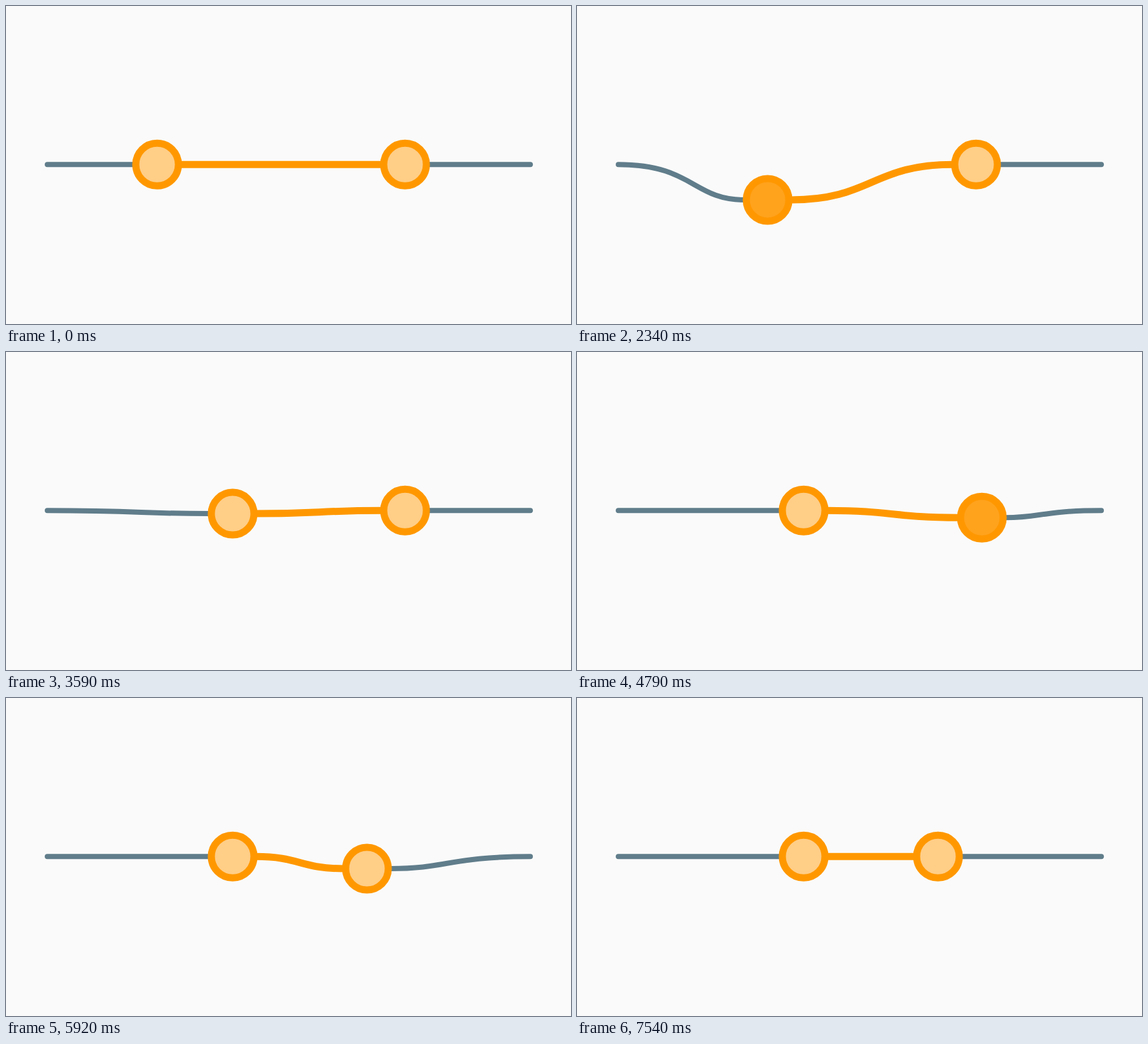
Recreate the animation shown at these times as an HTML page. Size 875 px wide and 492 px high, loop 7620 ms.

```html
<!DOCTYPE html>
<html lang="en">
<head>
<meta charset="utf-8">
<title>Elastic range slider</title>
<style>
  html, body { margin: 0; width: 100%; height: 100%; overflow: hidden; background: #fafafa; }
  svg { display: block; width: 100%; height: 100%; }
  path { fill: none; stroke-linecap: round; }
  .track { stroke: #607d8b; stroke-width: 8; }
  .range { stroke: #ff9800; stroke-width: 11; }
  circle { stroke: #ff9800; stroke-width: 11; }
</style>
</head>
<body>
<svg viewBox="0 0 875 492">
  <path class="track" id="before"/>
  <path class="track" id="after"/>
  <path class="range" id="between"/>
  <circle id="low" r="33"/>
  <circle id="high" r="33"/>
</svg>
<script>
  const LOOP = 7620, BASE = 245.3, START = 64, END = 812, EDGE = 36, HALF = 300;
  const IDLE = [255, 206, 135], HELD = [255, 162, 28];
  const el = id => document.getElementById(id);

  // drag points: time, x, vertical pull
  const low = {
    press: 1640, release: 2866, bounce: 0.6,
    drag: [[2000, 234, 0], [2340, 295, 54.5], [2560, 335, 63], [2800, 351, 64]]
  };
  const high = {
    press: 4440, release: 5550, bounce: 0.64,
    drag: [[4580, 618, 0], [4790, 627, 11], [5000, 621, 15], [5250, 584, -8], [5500, 559, -44]]
  };

  const clamp = v => Math.min(1, Math.max(0, v));

  function slope(pts, i, k) {
    const a = pts[i - 1], b = pts[i + 1];
    return a && b ? (b[k] - a[k]) / (b[0] - a[0]) : 0;
  }

  // smooth curve through the drag points
  function follow(pts, t, k) {
    const last = pts.length - 1;
    if (t <= pts[0][0]) return pts[0][k];
    if (t >= pts[last][0]) return pts[last][k];
    let i = 0;
    while (t > pts[i + 1][0]) i++;
    const a = pts[i], b = pts[i + 1], d = b[0] - a[0], u = (t - a[0]) / d;
    const v = 1 - u, m = u * u * (3 - 2 * u);
    return a[k] * (1 - m) + b[k] * m +
      d * u * v * (v * slope(pts, i, k) - u * slope(pts, i + 1, k));
  }

  function pose(thumb, t) {
    let pull = follow(thumb.drag, t, 2);
    if (t > thumb.release) {
      const n = (t - thumb.release) / HALF;
      pull *= Math.pow(thumb.bounce, n) * Math.cos(Math.PI * n) * clamp(6.3 - n);
    }
    const held = clamp((t - thumb.press) / 140) * clamp(1 - (t - thumb.release) / 160);
    return { x: follow(thumb.drag, t, 1), y: BASE + pull, held };
  }

  // the bend sits midway between anchors; the line itself stops at the thumb's rim
  function link(id, a, b) {
    const mid = (a.x + b.x) / 2;
    const x1 = a.x + (a.pin ? 0 : EDGE), x2 = b.x - (b.pin ? 0 : EDGE);
    el(id).setAttribute("d", `M${x1} ${a.y}C${mid} ${a.y} ${mid} ${b.y} ${x2} ${b.y}`);
  }

  function place(id, p) {
    const c = el(id), rgb = IDLE.map((v, i) => Math.round(v + (HELD[i] - v) * p.held));
    c.setAttribute("cx", p.x);
    c.setAttribute("cy", p.y);
    c.setAttribute("fill", `rgb(${rgb})`);
  }

  const head = { x: START, y: BASE, pin: true }, tail = { x: END, y: BASE, pin: true };

  function draw(t) {
    const a = pose(low, t), b = pose(high, t);
    link("before", head, a);
    link("between", a, b);
    link("after", b, tail);
    place("low", a);
    place("high", b);
  }

  const begin = performance.now();
  function tick(now) {
    draw(Math.max(0, now - begin) % LOOP);
    requestAnimationFrame(tick);
  }
  draw(0);
  requestAnimationFrame(tick);
</script>
</body>
</html>
```
